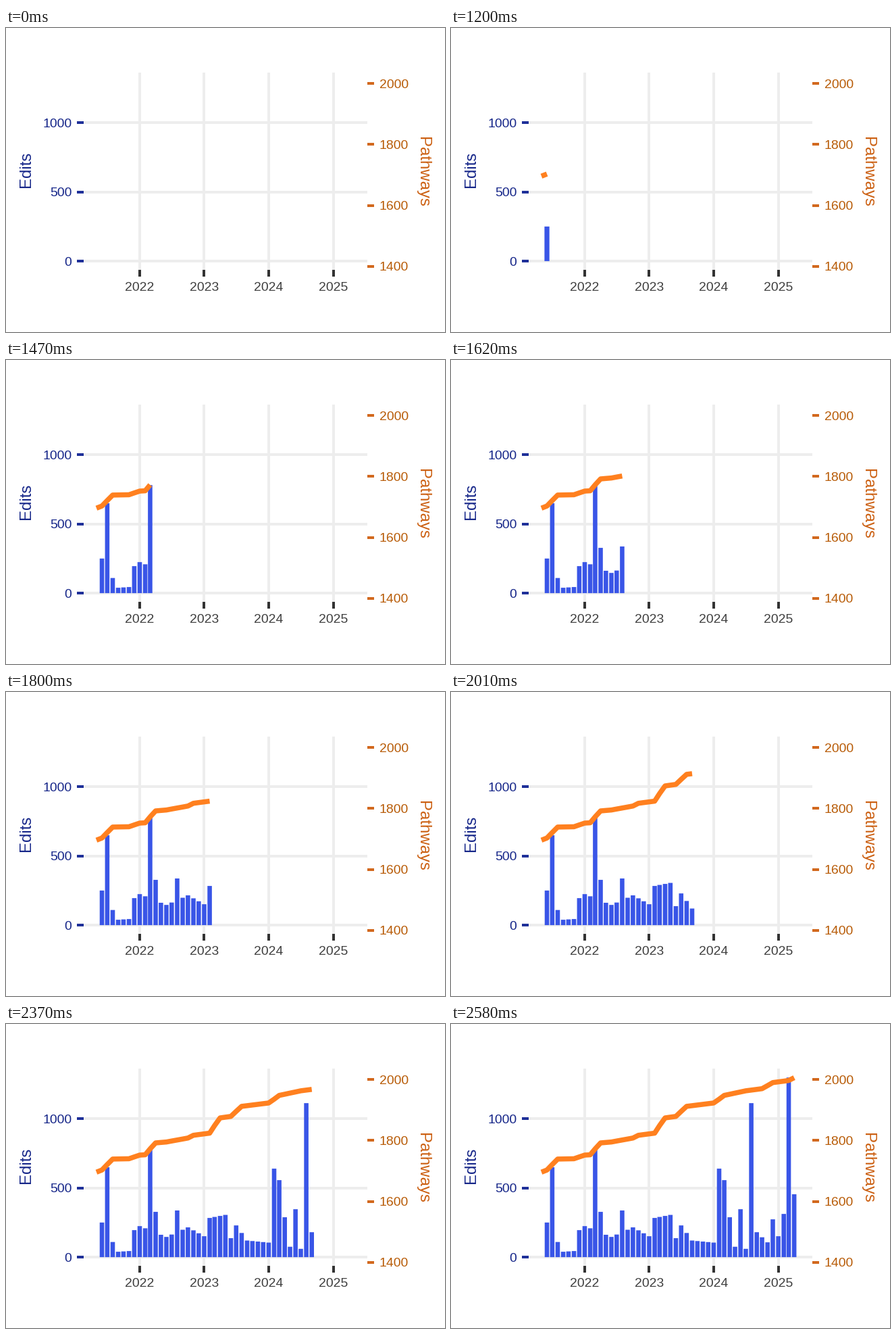
Animation, 650 px wide and 450 px high, one loop 2.61 s. Source, as a matplotlib script:

```python
import matplotlib.pyplot as plt
import numpy as np
from matplotlib.animation import FuncAnimation
from matplotlib.patches import Rectangle

W, H, DPI = 650, 450, 100
STEP_MS, HOLD, FRAMES = 30, 40, 87
PT = 72 / DPI

BLUE, ORANGE = "#3955e7", "#ff801f"
DARK_BLUE, DARK_ORANGE = "#1f3099", "#d2691e"
BLUE_TEXT, ORANGE_TEXT, ORANGE_TITLE = "#162689", "#b85c08", "#cc6012"
GRID, TICK, LABEL = "#ededed", "#333333", "#404040"

LEFT, RIGHT, TOP, BOTTOM = 115, 535, 66, 358.3
TICK_LEN, LINE_W = 10, 4
DAY_PX = 0.2615

months = np.arange("2021-05", "2025-05", dtype="datetime64[M]")
days = (months.astype("datetime64[D]") - np.datetime64("2022-01-01")).astype(int)
steps = np.arange(len(months))


def between(keys):
    """Monthly values on straight lines through (month, value) points."""
    return np.interp(steps, *zip(*keys))


# Steady growth with a few bursts; month 0 is May 2021
pathways = between([
    (0, 1696), (1, 1703), (3, 1739), (6, 1740), (8, 1752), (9, 1753),
    (11, 1792), (13, 1795), (17, 1808), (18, 1817), (21, 1824), (23, 1874),
    (25, 1879), (27, 1912), (32, 1923), (34, 1948), (38, 1963), (41, 1970),
    (43, 1990), (46, 1997), (47, 2006),
])

# Usual editing level, then the months that stand out from it
edits = between([
    (1, 250), (4, 39), (6, 44), (8, 224), (13, 146), (17, 215), (20, 151),
    (21, 283), (24, 305), (25, 137), (26, 229), (28, 120), (32, 105),
    (38, 60), (40, 180), (42, 107), (44, 151), (45, 312),
])
peaks = {2: 649, 7: 195, 10: 780, 11: 327, 15: 337, 33: 639, 34: 556,
         35: 288, 37: 346, 39: 1112, 43: 273, 46: 1297, 47: 454}
edits[list(peaks)] = list(peaks.values())


def day_x(day):
    return 198 + day * DAY_PX


def edit_y(value):
    return 345.1 - value * 0.205


def path_y(value):
    return 352.8 - (value - 1400) * 0.451


fig = plt.figure(figsize=(W / DPI, H / DPI), dpi=DPI, facecolor="white")
ax = fig.add_axes([0, 0, 1, 1])
ax.set(xlim=(0, W), ylim=(H, 0))
ax.axis("off")


def stroke(xs, ys, color):
    ax.plot(xs, ys, color=color, lw=LINE_W * PT, solid_capstyle="butt", zorder=1)


def label(x, y, text, color, size=19.4, **kw):
    ax.text(x, y, text, color=color, fontsize=size * PT, family="Liberation Sans",
            va="baseline", rotation_mode="anchor", **kw)


for value in (0, 500, 1000):
    y = edit_y(value)
    stroke([LEFT, RIGHT], [y, y], GRID)
    stroke([LEFT - TICK_LEN, LEFT], [y, y], DARK_BLUE)
    label(97.2, y + 6.8, str(value), BLUE_TEXT, ha="right")

for year in range(2022, 2026):
    start = np.datetime64(f"{year}-01-01") - np.datetime64("2022-01-01")
    x = day_x(start.astype(int))
    stroke([x, x], [TOP, BOTTOM], GRID)
    stroke([x, x], [BOTTOM, BOTTOM + TICK_LEN - 0.5], TICK)
    label(x, 388.8, str(year), LABEL, ha="center")

for value in range(1400, 2001, 200):
    y = path_y(value)
    stroke([RIGHT, RIGHT + TICK_LEN], [y, y], DARK_ORANGE)
    label(552.5, y + 6.6, str(value), ORANGE_TEXT, ha="left")

label(35.6, 209, "Edits", BLUE_TEXT, 24, rotation=90, ha="center")
label(610.5, 212.5, "Pathways", ORANGE_TITLE, 24, rotation=-90, ha="center")

bars = [
    ax.add_patch(Rectangle((0, edit_y(v)), 0, edit_y(0) - edit_y(v),
                           fc=BLUE, lw=0, snap=False, zorder=2))
    for v in edits[1:]
]
trend, = ax.plot([], [], color=ORANGE, lw=7.5 * PT, zorder=3,
                 solid_capstyle="butt", solid_joinstyle="round")


def update(frame):
    shown = max(0, frame - HOLD + 1)
    n = shown + 1 if shown else 0
    trend.set_data(day_x(days[:n]), path_y(pathways[:n]))
    # Bar width follows the shortest month shown so far
    width = 0.9 * DAY_PX * np.diff(days[:n]).min() if shown else 0
    for i, bar in enumerate(bars):
        bar.set_visible(i < shown)
        bar.set_x(day_x(days[i + 1]) - width / 2)
        bar.set_width(width)
    return [trend, *bars]


anim = FuncAnimation(fig, update, frames=FRAMES, interval=STEP_MS,
                     repeat=True, repeat_delay=0)
plt.show()
```
